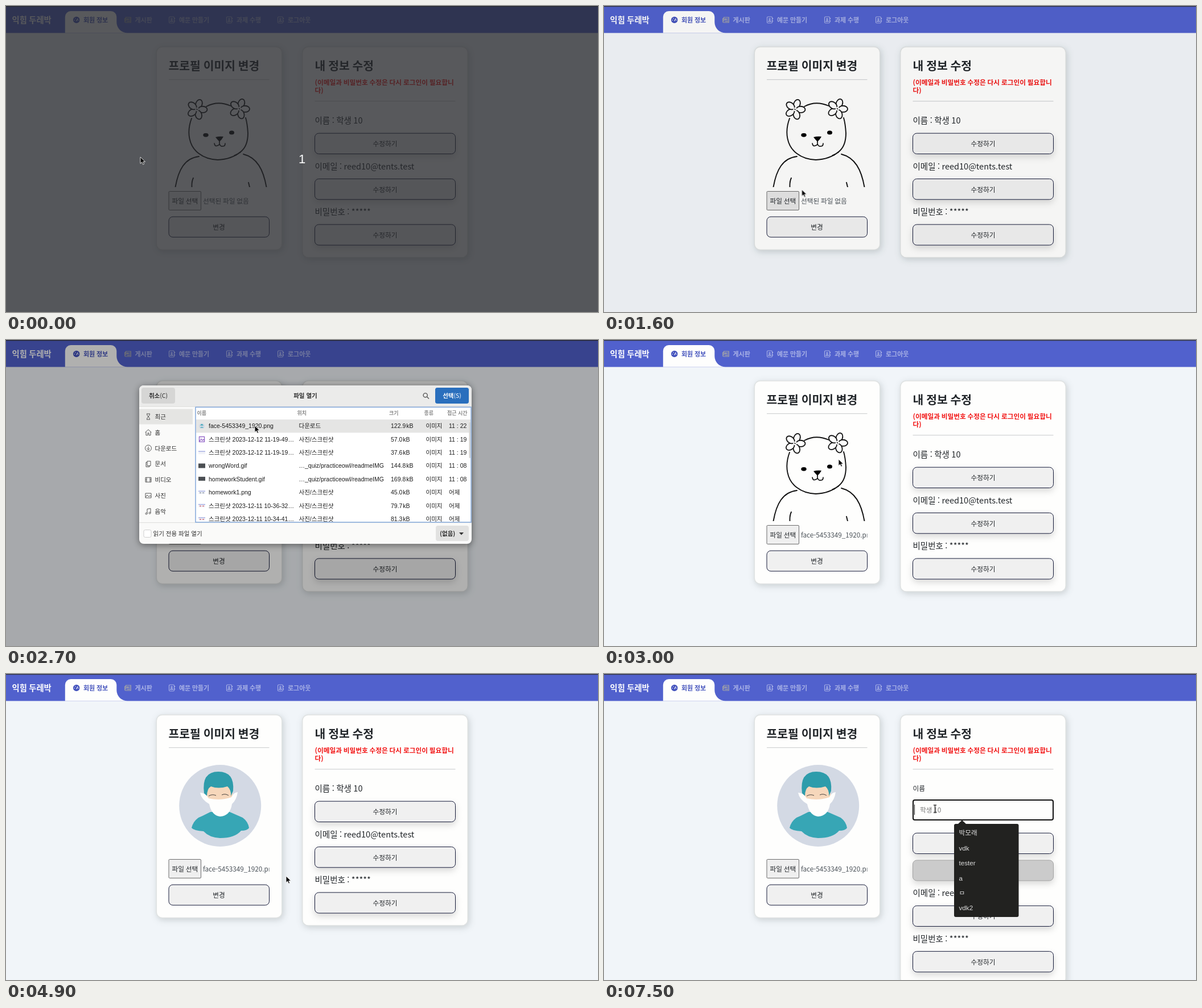
Animation, 1040 px wide and 539 px high, one loop 8 s. Source, as an HTML page:

```html
<!DOCTYPE html>
<html lang="ko">
<head>
<meta charset="utf-8">
<title>회원 정보</title>
<style>
html, body { margin: 0; width: 100%; height: 100%; overflow: hidden; background: #f1f5f9; }
svg.stage { display: block; width: 1040px; height: 539px; }
text { font: 11.7px "Noto Sans CJK KR", "Noto Sans", sans-serif; word-spacing: -.04em; fill: #212529; white-space: pre; }
.mid { text-anchor: middle; }
.title { font-size: 20.4px; font-weight: 700; }
.label { font-size: 14.5px; }
.note { font-weight: 700; fill: #f21414; }
.soft { fill: #495057; }
.nav text { font-size: 11px; font-weight: 600; fill: #a9b2e6; }
.nav use { stroke: #a9b2e6; }
.card { fill: #fefefd; stroke: #dfe2e2; stroke-width: 1.5; filter: drop-shadow(2px 3px 6px rgba(30,50,50,.19)); }
.rule { stroke: #c8cacc; }
.btn { fill: #f0f0f0; stroke: #161b3a; stroke-width: 1; }
.raised { filter: drop-shadow(0 5px 6px rgba(0,0,0,.15)); }
.line { fill: none; stroke: #111; stroke-width: 1.9; stroke-linecap: round; stroke-linejoin: round; }
.dialog text { font-size: 10.5px; word-spacing: 0; fill: #2b2b2b; }
.dialog .strong { font-weight: 700; }
.dialog .head { font-size: 9px; font-weight: 600; fill: #8a8a8a; }
.dialog .cell { font-family: "Liberation Sans", "Noto Sans CJK KR", sans-serif; fill: #1c1c1c; }
.menu text { font: 11.7px "Liberation Sans", "Noto Sans CJK KR", sans-serif; fill: #ddd; }
.icon { fill: none; stroke: #555; stroke-width: 1; }

/* 100 ms = 1.25% */
.anim { animation: 8s step-end -20ms infinite; }
.arrow { animation-name: arrow; }
.beam { animation-name: beam; }
.veil { animation-name: veil; opacity: 0; }
.dim { animation-name: dim; opacity: 0; }
.dialog { animation-name: dialog; visibility: hidden; }
.chosen { animation-name: chosen; opacity: 0; }
.nofile { animation-name: nofile; }
.file { animation-name: file; }
.filebtn { animation-name: filebtn; }
.change { animation-name: change; }
.bear { animation-name: bear; }
.nurse { animation-name: nurse; }
.closed { animation-name: closed; }
.open { animation-name: open; }
.lower { animation-name: lower; }
.grow { animation-name: grow; }
.input { animation-name: input; }
.menu { animation-name: menu; }
.caret { animation-name: caret; }
@keyframes veil { 0% { opacity: 1 } 1.25% { opacity: .55 } 2.5% { opacity: .15 } 3.75% { opacity: 0 } }
@keyframes dim {
  0% { opacity: 0 } 20% { opacity: .035 } 21.25% { opacity: .12 } 23.75% { opacity: .23 }
  25% { opacity: .265 } 26.25% { opacity: .285 } 27.5% { opacity: .3 } 28.75% { opacity: .31 }
  36.25% { opacity: .08 } 37.5% { opacity: 0 }
}
@keyframes dialog { 0% { visibility: hidden } 23.75% { visibility: visible } 36.25% { visibility: hidden } }
@keyframes chosen { 0% { opacity: 0 } 31.25% { opacity: .45 } 32.5% { opacity: .8 } 33.75% { opacity: 1 } }
@keyframes nofile { 0% { visibility: visible } 36.25% { visibility: hidden } }
@keyframes file { 0% { visibility: hidden } 36.25% { visibility: visible } }
@keyframes filebtn { 0% { fill: #efefef } 10% { fill: #e5e5e5 } 23.75% { fill: #efefef } }
@keyframes change { 0% { fill: #f0f0f0 } 45% { fill: #e7e7e7 } 55% { fill: #f0f0f0 } }
@keyframes bear { 0% { visibility: visible } 52.5% { visibility: hidden } }
@keyframes nurse { 0% { visibility: hidden } 52.5% { visibility: visible } }
@keyframes closed { 0% { visibility: visible } 70% { visibility: hidden } }
@keyframes open { 0% { visibility: hidden } 70% { visibility: visible } }
@keyframes lower { 0% { transform: none } 70% { transform: translateY(103.7px) } }
@keyframes grow { 0% { height: 371px } 70% { height: 474.7px } }
@keyframes input { 0% { stroke: #8a8a8a; stroke-width: 1 } 80% { stroke: #101010; stroke-width: 2 } }
@keyframes menu { 0% { visibility: hidden } 80% { visibility: visible } }
@keyframes caret { 0% { visibility: hidden } 80% { visibility: visible } 86.25% { visibility: hidden } 93.75% { visibility: visible } }
@keyframes arrow {
  0% { transform: translate(236px,266px); animation-timing-function: steps(9) }
  11.25% { transform: translate(328px,341px) }
  17.5% { transform: translate(328px,343px) }
  20% { transform: translate(347.5px,323.5px) }
  21.25% { transform: translate(384px,276px) }
  23.75% { transform: translate(455px,180px); animation-timing-function: steps(4) }
  28.75% { transform: translate(437px,151px) }
  36.25% { transform: translate(426px,179px) }
  37.5% { transform: translate(412px,210px); animation-timing-function: steps(7) }
  46.25% { transform: translate(359px,397px) }
  48.75% { transform: translate(361px,397px) }
  52.5% { transform: translate(380px,402px); animation-timing-function: steps(7) }
  61.25% { transform: translate(492px,356px) }
  62.5% { transform: translate(518px,342px); animation-timing-function: steps(5) }
  68.75% { transform: translate(594px,243px); visibility: visible }
  70%, 100% { transform: translate(594px,243px); visibility: hidden }
}
@keyframes beam {
  0% { transform: translate(594px,244px); visibility: hidden }
  70% { transform: translate(594px,244px); visibility: visible; animation-timing-function: steps(2) }
  72.5% { transform: translate(576px,239px); visibility: visible }
  75% { transform: translate(577px,236px); visibility: visible; animation-timing-function: steps(2) }
  77.5% { transform: translate(577px,231px); visibility: visible }
  93.75%, 100% { transform: translate(581.5px,237.5px); visibility: visible }
}
</style>
</head>
<body>
<svg class="stage" viewBox="0 0 1040 539">
  <defs>
    <g id="edit"><rect class="btn raised" x="542.5" width="247" height="36.3" rx="7"/><text class="mid" x="666" y="23">수정하기</text></g>
    <g id="book" fill="none" stroke-width="1.1"><rect x="-4.5" y="-5.5" width="9" height="11" rx="1.5"/><circle cy="-1.6" r="1.2"/><path d="M-2.4 2.6Q0 -.6 2.4 2.6zM5.6-3.5v2M5.6 1v2"/></g>
    <g id="flower" fill="#fefefd" stroke="#111" stroke-width="1.8">
      <g id="petals"></g><circle r="3.2" stroke="none"/><path d="M-1-1l2 2" stroke-width="1.4"/>
    </g>
    <clipPath id="photo"><rect x="286" y="140" width="177" height="179"/></clipPath>
    <clipPath id="field"><rect x="340" y="326" width="122.5" height="34"/></clipPath>
    <clipPath id="list"><rect x="334" y="119" width="483" height="201"/></clipPath>
  </defs>

  <rect width="1040" height="539" fill="#f1f5f9"/>
  <g class="nav">
    <rect width="1040" height="47.5" fill="#5161cd"/>
    <rect width="1040" height="1.3" fill="#33343c"/>
    <text x="10.5" y="29.5" style="font-size:14.3px;font-weight:700;fill:#fff">익힘 두레박</text>
    <path d="M103.8 47.5V19a10 10 0 0 1 10-10h70.5a10 10 0 0 1 10 10v9.500a19 19 0 0 0 19 19z" fill="#fefefd"/>
    <circle cx="123.7" cy="24.5" r="5.8" fill="#4453bd"/>
    <path d="M123.7 26.5l2.5-4.5M119.8 25h1M121.5 21.5l.7.7M126.7 25h1" stroke="#fff" stroke-width="1.3"/>
    <text x="136" y="28.5" style="fill:#4453bd;font-weight:700">회원 정보</text>
    <path d="M210.5 20h8.700v9h-9q-1.500 0-1.500-2v-5h1.800zM210.5 20v7M212.500 22.500h2.500v2h-2.500zM216.500 22.500h1.500M216.500 24.500h1.500M212.500 26.800h5.500" fill="none" stroke="#aaa9a4" stroke-width="1.2"/>
    <text x="226.5" y="28.5">게시판</text>
    <use href="#book" x="291" y="24.5"/><text x="304" y="28.5">예문 만들기</text>
    <use href="#book" x="392" y="24.5"/><text x="405" y="28.5">과제 수행</text>
    <use href="#book" x="482" y="24.5"/><text x="495" y="28.5">로그아웃</text>
  </g>

  <rect class="card" x="264.3" y="72" width="220.5" height="357.5" rx="10"/>
  <text class="title" x="285.5" y="112.8">프로필 이미지 변경</text>
  <path class="rule" d="M286 129.7h176.5"/>
  <g class="anim bear" clip-path="url(#photo)">
    <g class="line">
      <path d="M352 177Q372 166 395 176M326 198C317 222 321 247 339 260Q352 270 372 271Q396 270 412 257Q425 247 425 224Q424 207 421 197"/>
      <path d="M339 265C314 268 303 288 297.5 319M417 261C441 267 452 288 457.5 319M329 303Q326 309 326.5 319M426 311l2 8"/>
      <path d="M401 263l11-5M404 263l9-7" stroke-width="1.2"/>
      <path d="M375 238v6M366 242q1 6 5 4q4-1 4-3q2 5 6 4q4 0 4-5" stroke-width="1.7"/>
    </g>
    <path d="M368 231q7-2 14-1q-3 6-7 9q-4-4-7-8z"/>
    <ellipse cx="351" cy="227.3" rx="4.7" ry="3.4"/><ellipse cx="396.5" cy="223" rx="4.5" ry="3.5"/>
    <use href="#flower" x="335.5" y="182"/><use href="#flower" x="410" y="181"/>
  </g>
  <g class="anim nurse">
    <circle cx="376.2" cy="232" r="72" fill="#d3d9e4"/>
    <path d="M326 271Q330 255 345 250L359 243H393L409 250Q424 255 427 271Q424 276 413 276Q402 289 376 289Q357 288 347 277Q330 276 326 271z" fill="#37a6b5"/>
    <path d="M352 196h46v28h-46z" fill="#f6d7bb"/>
    <path d="M348 210Q343 172 373 172Q402 172 399 206L395 215Q396 204 389 198Q373 203 360 198Q353 202 353 215z" fill="#2e9cab"/>
    <path d="M341 209Q350 209 356 219Q376 224 396 217Q399 209 407 208Q405 222 397 229Q394 250 376 251Q361 249 357 229Q343 221 341 209z" fill="#fefefd"/>
    <path d="M356 215q6-4 13-1M379 213q6-3 12 1" fill="none" stroke="#47423f" stroke-width="1"/>
  </g>
  <rect class="anim filebtn" x="286" y="326.5" width="56.5" height="33" rx="1.5" stroke="#6b6b6b" fill="#efefef"/>
  <text x="291.5" y="348">파일 선택</text>
  <g clip-path="url(#field)">
    <text class="anim nofile soft" x="346" y="348">선택된 파일 없음</text>
    <text class="anim file soft" x="346" y="348">face-5453349_1920.png</text>
  </g>
  <rect class="anim btn change" x="286" y="371.2" width="176.5" height="36" rx="7"/>
  <text class="mid" x="374" y="394">변경</text>

  <rect class="card anim grow" x="520.7" y="72" width="290.5" height="371" rx="10"/>
  <text class="title" x="542.5" y="112.8">내 정보 수정</text>
  <text class="note" x="542.5" y="138.5">(이메일과 비밀번호 수정은 다시 로그인이 필요합니</text>
  <text class="note" x="542.5" y="153.3">다)</text>
  <path class="rule" d="M542.5 167.7h247"/>
  <g class="anim closed">
    <text class="label" x="542.5" y="207">이름 : 학생 10</text>
    <use href="#edit" y="224.2"/>
  </g>
  <g class="anim open">
    <text x="542.5" y="205.5">이름</text>
    <rect class="anim input" x="543" y="222" width="246" height="35" rx="3" fill="#fefefd"/>
    <text x="555" y="244" style="fill:#757575">학생 10</text>
    <rect class="btn raised" x="542.5" y="280.2" width="247" height="36.3" rx="7"/><text class="mid" x="666" y="303">취소</text>
    <rect class="raised" x="542.5" y="328" width="247" height="36" rx="7" fill="#cbcbcb" stroke="#a3a3a3"/><text class="mid" x="666" y="350.5" style="fill:#888">수정하기</text>
  </g>
  <g class="anim lower">
    <text class="label" x="542.5" y="287.5">이메일 : reed10@tents.test</text>
    <use href="#edit" y="304.5"/>
    <text class="label" x="542.5" y="368">비밀번호 : *****</text>
    <use href="#edit" y="384.9"/>
  </g>
  <path class="anim caret" d="M545.5 230v18" stroke="#111"/>
  <g class="anim menu" id="menu">
    <path d="M618 264h4l7-6.500 7 6.500h89.500a3 3 0 0 1 3 3v158a3 3 0 0 1-3 3H618a3 3 0 0 1-3-3V267a3 3 0 0 1 3-3z" fill="#222220"/>
  </g>

  <rect class="anim dim" width="1040" height="539"/>

  <g class="anim dialog">
    <rect x="234" y="80" width="584" height="279" rx="8" fill="#fafaf9" style="filter:drop-shadow(0 2px 6px rgba(0,0,0,.45))"/>
    <path d="M234 117V88a8 8 0 0 1 8-8h568a8 8 0 0 1 8 8v29z" fill="#ebebea"/>
    <path d="M234 117.3h584M234 321.7h584" stroke="#dcdcda"/>
    <rect x="238" y="84" width="59" height="28" rx="4" fill="#d6d6d5"/>
    <text class="strong mid" x="267.5" y="102">취소<tspan font-weight="400">(C)</tspan></text>
    <text class="strong mid" x="526" y="102">파일 열기</text>
    <path class="icon" d="M739.7 100.2l3.300 3.300M740.300 97.200a3.600 3.600 0 1 1-7.200 0a3.600 3.600 0 1 1 7.200 0" style="stroke-width:1.4"/>
    <rect x="754" y="84" width="59" height="28" rx="4" fill="#92b8e6"/>
    <rect class="anim chosen" x="754" y="84" width="59" height="28" rx="4" fill="#2a6fbd"/>
    <text class="strong mid" x="783.5" y="102" style="fill:#fff">선택<tspan font-weight="400">(S)</tspan></text>
    <rect x="234" y="121.5" width="94" height="27" fill="#e5e5e3"/>
    <g id="places"></g>
    <rect x="333" y="118.3" width="484" height="202.7" fill="#fff"/>
    <rect class="anim chosen" x="334" y="140" width="483" height="23.3" fill="#e5e5e4"/>
    <g id="rows" clip-path="url(#list)"></g>
    <rect x="813.5" y="145" width="2.5" height="63" rx="1" fill="#d4d4d4"/>
    <rect x="333" y="118.3" width="484" height="202.7" fill="none" stroke="#83a8da" stroke-width="1.5"/>
    <rect x="242" y="334.5" width="13" height="13" rx="2.5" fill="#fff" stroke="#cfcfcf"/>
    <text x="258.5" y="345">읽기 전용 파일 열기</text>
    <rect x="755" y="327" width="58" height="27" rx="4" fill="#e2e2e1"/>
    <text class="strong" x="762" y="344.5">(없음)</text>
    <path d="M796 339h8l-4 4.5z" fill="#333"/>
  </g>

  <g class="anim veil">
    <rect width="1040" height="539" fill="#26282b" opacity=".77"/>
    <text class="mid" x="520" y="276.5" style="font:22px 'Liberation Sans',sans-serif;fill:#fff">1</text>
  </g>
  <path class="anim arrow" d="M0 0V11.5L2.7 9l1.9 4.2 2-.9L4.8 8.3H8.5z" fill="#0a0a0a" stroke="#fff" stroke-width=".8"/>
  <path class="anim beam" d="M-2.5-6.5h5M0-6.5v13M-2.5 6.5h5" fill="none" stroke="#222" stroke-width="1.3"/>
</svg>
<script>
const NS = 'http://www.w3.org/2000/svg';
const get = id => document.getElementById(id);
function add(parent, tag, attrs, content) {
  const el = document.createElementNS(NS, tag);
  for (const key in attrs) el.setAttribute(key, attrs[key]);
  if (content) el.textContent = content;
  return parent.appendChild(el);
}

for (let i = 0; i < 5; i++)
  add(get('petals'), 'ellipse', { cx: 10, rx: 8, ry: 5.6, transform: `rotate(${i * 72 - 70})` });

['박모래', 'vdk', 'tester', 'a', 'ㅁ', 'vdk2'].forEach((name, i) =>
  add(get('menu'), 'text', { x: 623.5, y: 284.3 + i * 26.4 }, name));

const places = [
  ['최근', 'M-3-5h6M-3 5h6M-2.5-5q0 3 2.5 5q2.5-2 2.5-5M-2.5 5q0-3 2.5-5q2.5 2 2.5 5'],
  ['홈', 'M-5.5 0L0-5 5.5 0M-4-1v6h3V1h2v4h3v-6'],
  ['다운로드', 'M-5.5 0a5.5 5.5 0 1 1 11 0a5.5 5.5 0 1 1-11 0M0-3v6M-2.5 .5L0 3 2.5 .5'],
  ['문서', 'M-2-5h6v8h-6zM-2-3h-2v8h6v-2'],
  ['비디오', 'M-5-4h10v8h-10zM-3-4v8M3-4v8M-5 0h2M3 0h2'],
  ['사진', 'M-5-4h10v8h-10zM-5 3l3-4 3 3 2-2 2 2'],
  ['음악', 'M-2 4v-8l6-1v8M-2 4a1.5 1.5 0 1 1-3 0a1.5 1.5 0 1 1 3 0M4 3a1.5 1.5 0 1 1-3 0a1.5 1.5 0 1 1 3 0']
];
places.forEach(([name, d], i) => {
  const y = 135 + i * 27.8;
  add(get('places'), 'path', { class: 'icon', d, transform: `translate(250 ${y})` });
  add(get('places'), 'text', { x: 261.5, y: y + 4 }, name);
});

const rows = get('rows');
const heads = [[335.5, '이름'], [511.5, '위치'], [673, '크기'], [734.5, '종류'], [775, '접근 시간']];
heads.forEach(([x, name]) => add(rows, 'text', { class: 'head', x, y: 131.7 }, name));

const shots = '사진/스크린샷', repo = '…_quiz/practiceowl/readmeIMG';
const files = [
  ['face-5453349_1920.png', '다운로드', '122.9', '11 : 22'],
  ['스크린샷 2023-12-12 11-19-49…', shots, '57.0', '11 : 19'],
  ['스크린샷 2023-12-12 11-19-19…', shots, '37.6', '11 : 19'],
  ['wrongWord.gif', repo, '144.8', '11 : 08'],
  ['homeworkStudent.gif', repo, '169.8', '11 : 08'],
  ['homework1.png', shots, '45.0', '어제'],
  ['스크린샷 2023-12-11 10-36-32…', shots, '79.7', '어제'],
  ['스크린샷 2023-12-11 10-34-41…', shots, '81.3', '어제']
];
function thumb(i, y) {
  if (i === 0) {
    add(rows, 'circle', { cx: 344, cy: y, r: 5, fill: '#d3d9e4' });
    add(rows, 'path', { d: `M341 ${y - 1}q3-5 6 0zM340.5 ${y + 3}q3.5-3 7 0z`, fill: '#37a6b5' });
  } else if (i === 1) {
    add(rows, 'path', { d: `M339.5 ${y - 4.5}h9v9h-9zM340 ${y + 3}l3-3 2 2 2-1.5 2 2M342 ${y - 2}h1`, class: 'icon', style: 'stroke:#8c5cc4;stroke-width:1.3' });
  } else if (i === 3 || i === 4) {
    add(rows, 'rect', { x: 338, y: y - 4, width: 12, height: i === 3 ? 8 : 7, fill: '#4b4f53' });
  } else {
    add(rows, 'rect', { x: 338, y: y - 3, width: 12, height: 6, fill: '#f1f2f8' });
    add(rows, 'path', { d: `M338 ${y - 2}h12`, stroke: '#9aa4e0', 'stroke-width': 1.2 });
    if (i > 2) add(rows, 'path', { d: `M340 ${y + 1}h3m2 0h3`, stroke: i > 5 ? '#d0707c' : '#8d99a8', 'stroke-width': 1.5 });
  }
}
files.forEach(([name, place, size, time], i) => {
  const y = 151.5 + i * 23.35;
  thumb(i, y);
  [[356, name], [514.5, place], [676, size + '\u200a' + 'kB'], [737.5, '이미지'], [778, time]].forEach(([x, value]) =>
    add(rows, 'text', { class: 'cell', x, y: y + 3.9 }, value));
});
</script>
</body>
</html>
```
